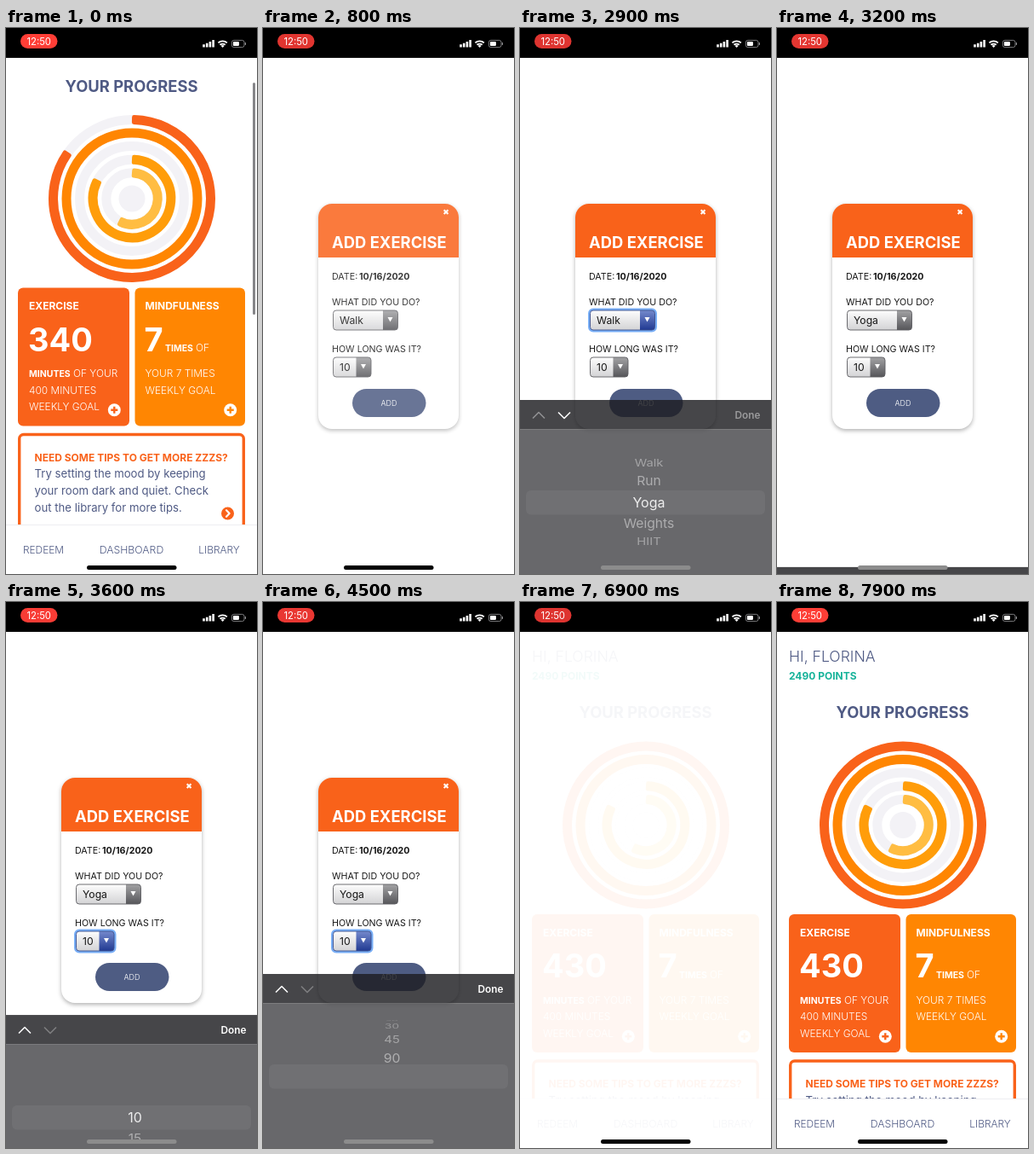
An HTML page that plays this animation: 295 px wide and 640 px high, repeating every 8 s.

```html
<!DOCTYPE html>
<html lang="en">
<head>
<meta charset="utf-8">
<title>Wellness tracker</title>
<style>
html, body { margin: 0; width: 100%; height: 100%; overflow: hidden; background: #fff; }
svg { display: block; width: 295px; height: 640px; }
text { font-family: Inter, "Open Sans", sans-serif; fill: #4f5a84; font-weight: 400; }
.mid { text-anchor: middle; }
.bold { font-weight: 700; }
.title { font-size: 18.4px; font-weight: 700; }
.white text, text.white { fill: #fff; }
.cap { font-size: 12px; font-weight: 700; }
.big { font-size: 38px; font-weight: 700; }
.thin { font-size: 11.9px; font-weight: 300; }
.unit { font-size: 10.5px; font-weight: 700; }
.body { font-size: 13.2px; }
.form text { font-size: 10.7px; fill: #161616; }
.form text.val { font-size: 12.2px; }
.row { font-size: 16px; }
.line { fill: none; stroke: #fff; stroke-linecap: round; stroke-linejoin: round; }
#popup { filter: drop-shadow(0 2px 2.5px rgba(0, 0, 0, .3)); }
</style>
</head>
<body>
<svg viewBox="0 0 295 640">
  <defs>
    <linearGradient id="face" x2="0" y2="1"><stop stop-color="#fdfdfd"/><stop offset="1" stop-color="#d3d3d5"/></linearGradient>
    <linearGradient id="gray" x2="0" y2="1"><stop stop-color="#a2a2a4"/><stop offset="1" stop-color="#56565a"/></linearGradient>
    <linearGradient id="blue" x2="0" y2="1"><stop stop-color="#7489cc"/><stop offset="1" stop-color="#213a92"/></linearGradient>
  </defs>
  <rect width="295" height="640" fill="#fff"/>

  <g id="dash">
    <g id="page">
      <text x="14" y="70" font-size="17.6" style="font-weight:300">HI, FLORINA</text>
      <text class="cap" x="14" y="91" style="fill:#17b39a">2490 POINTS</text>
      <text class="title mid" x="147.5" y="136">YOUR PROGRESS</text>
      <g id="rings" transform="translate(148 261.5)"></g>

      <g class="white">
        <rect x="14" y="366" width="131" height="162" rx="6" fill="#f9621a"/>
        <text class="cap" x="27" y="391.5">EXERCISE</text>
        <text class="big" id="minutes" x="26" y="440"></text>
        <text class="unit" x="27" y="470.5">MINUTES</text>
        <text class="thin" x="79" y="470.5">OF YOUR</text>
        <text class="thin" x="27" y="490">400 MINUTES</text>
        <text class="thin" x="27" y="509.5">WEEKLY GOAL</text>
        <circle cx="127.3" cy="509.3" r="7.5" fill="#fff"/>
        <path d="M123.3 509.3h8m-4-4v8" stroke="#f9621a" stroke-width="2.4"/>

        <rect x="151.5" y="366" width="129.5" height="162" rx="6" fill="#ff8602"/>
        <text class="cap" x="163.5" y="391.5">MINDFULNESS</text>
        <text class="big" x="162.5" y="440">7</text>
        <text class="unit" x="187" y="440.5">TIMES</text>
        <text class="thin" x="223" y="440.5">OF</text>
        <text class="thin" x="163.5" y="470.5">YOUR 7 TIMES</text>
        <text class="thin" x="163.5" y="490">WEEKLY GOAL</text>
        <circle cx="263.7" cy="509.3" r="7.5" fill="#fff"/>
        <path d="M259.7 509.3h8m-4-4v8" stroke="#ff8602" stroke-width="2.4"/>
      </g>

      <rect x="15.7" y="538" width="263.6" height="130" rx="5" fill="#fff" stroke="#f9621a" stroke-width="3.4"/>
      <text class="cap" x="33.5" y="569" style="fill:#f9621a">NEED SOME TIPS TO GET MORE ZZZS?</text>
      <text class="body" x="33.5" y="588.5">Try setting the mood by keeping</text>
      <text class="body" x="33.5" y="608.3">your room dark and quiet. Check</text>
      <text class="body" x="33.5" y="628">out the library for more tips.</text>
      <circle cx="260.5" cy="630.5" r="7.5" fill="#f9621a"/>
      <path class="line" d="M259 626.8l3.6 3.7-3.6 3.7" stroke-width="2.2"/>
    </g>
    <rect y="583" width="295" height="57" fill="#fff"/>
    <rect y="582" width="295" height="1" fill="#eeeef1"/>
    <g class="mid">
      <text class="thin" x="44" y="616">REDEEM</text>
      <text class="thin" x="147.5" y="616" style="font-size:12.3px">DASHBOARD</text>
      <text class="thin" x="250.5" y="616">LIBRARY</text>
    </g>
    <rect id="bar" x="290" y="64" width="3" height="272" rx="1.5" fill="#858588"/>
  </g>

  <g id="popup">
    <rect x="65" y="206" width="165" height="264" rx="16" fill="#fff"/>
    <path d="M65 269v-47a16 16 0 0 1 16-16h133a16 16 0 0 1 16 16v47z" fill="#f9621a"/>
    <path d="M212.7 213.2l4.8 4.8m0-4.8l-4.8 4.8" stroke="#fff" stroke-width="2.1"/>
    <text class="title white" x="81" y="258">ADD EXERCISE</text>
    <g class="form">
      <text x="81" y="295">DATE:</text>
      <text class="bold" x="113" y="295">10/16/2020</text>
      <text x="81" y="324.5">WHAT DID YOU DO?</text>
      <text x="81" y="379.5">HOW LONG WAS IT?</text>
      <g id="what"></g>
      <g id="long"></g>
    </g>
    <rect x="105" y="423" width="86.5" height="33" rx="16.5" fill="#4e5c83"/>
    <text class="mid white" x="148" y="442.5" font-size="9" style="font-weight:300">ADD</text>
  </g>

  <g id="picker">
    <rect width="295" height="34.5" fill="#1e1e21" fill-opacity=".82"/>
    <rect y="34.5" width="295" height="180" fill="#505053" fill-opacity=".86"/>
    <path id="up" class="line" d="M15 21.5l7-7 7 7" stroke-width="1.6" style="stroke-linecap:butt"/>
    <path id="down" class="line" d="M45 14.5l7 7 7-7" stroke-width="1.6" style="stroke-linecap:butt"/>
    <text id="done" class="white" x="282.5" y="22" font-size="11.8" text-anchor="end" style="font-weight:600">Done</text>
    <rect x="7" y="106" width="281" height="28.5" rx="6" fill="#fff" fill-opacity=".055"/>
    <g id="rows"></g>
  </g>

  <rect id="home" x="95" y="630" width="105.5" height="5" rx="2.5"/>

  <g>
    <rect width="295" height="35" fill="#000"/>
    <rect id="pill" x="17" y="7" width="43.5" height="17" rx="8.5"/>
    <text class="mid white" x="38.7" y="19.7" font-size="11.3">12:50</text>
    <path d="M232.5 22.5v-3.2m3.7 3.2v-4.8m3.7 4.8v-6.6m3.7 6.6v-8.6" stroke="#fff" stroke-width="2.6"/>
    <g class="line" stroke-width="1.9" style="stroke-linecap:butt">
      <path d="M249.4 17.4a7.6 7.6 0 0 1 10.4 0"/>
      <path d="M251.5 19.8a4.6 4.6 0 0 1 6.2 0"/>
    </g>
    <path d="M254.6 23l-2-2a2.9 2.9 0 0 1 4 0z" fill="#fff"/>
    <rect x="265.4" y="14.4" width="14.6" height="8.2" rx="2.4" fill="none" stroke="#8b8b8d" stroke-width=".9"/>
    <rect x="266.9" y="15.9" width="7" height="5.2" rx="1" fill="#fff"/>
    <path d="M281.4 17v3" stroke="#8b8b8d" stroke-width="1.2"/>
  </g>
</svg>
<script>
const LOOP = 8000, STEP = 100;
const $ = id => document.getElementById(id);
const set = (el, attrs) => { for (const k in attrs) el.setAttribute(k, attrs[k]); };
const clamp = u => Math.min(1, Math.max(0, u));
const smooth = u => u * u * (3 - 2 * u);
const quartOut = u => 1 - (1 - u) ** 4;

// Value at time t along [time, value] steps.
function track(t, steps, ease = smooth) {
  let value = steps[0][1];
  for (let i = 1; i < steps.length; i++) {
    const [t0, v0] = steps[i - 1], [t1, v1] = steps[i];
    if (t >= t0) value = v0 + (v1 - v0) * ease(clamp((t - t0) / (t1 - t0)));
  }
  return value;
}

// Ring segment clockwise from the top with softly rounded corners.
function segment(r, share, color) {
  const c = 2.5, half = 5.5 - c;
  const a = c / r, b = share * 2 * Math.PI - c / r;
  const at = (rad, ang) => `${rad * Math.sin(ang)} ${-rad * Math.cos(ang)}`;
  const big = b - a > Math.PI ? 1 : 0, o = r + half, i = r - half;
  return `<path d="M${at(o, a)}A${o} ${o} 0 ${big} 1 ${at(o, b)}L${at(i, b)}A${i} ${i} 0 ${big} 0 ${at(i, a)}z"
    fill="${color}" stroke="${color}" stroke-width="${2 * c}" stroke-linejoin="round"/>`;
}

const hoop = (r, color) => `<circle r="${r}" fill="none" stroke="${color}" stroke-width="11"/>`;

function rings(exercise) {
  const list = [[92.5, exercise, '#f9621a'], [77, 1, '#ff8602'], [61.4, 0], [45.8, .83, '#ff9d0a'], [30.2, .585, '#ffbd42']];
  return '<circle r="15.5" fill="#f3f2f6"/>' + list.map(([r, share, color]) =>
    share >= 1 ? hoop(r, color) : hoop(r, '#f3f2f6') + (share ? segment(r, share, color) : '')).join('');
}

function select(y, w, value, focus) {
  const x = 82.5, right = x + w, cut = right - 17.5, m = right - 9;
  const ring = focus ? `<rect x="${x - 1}" y="${y - 1}" width="${w + 2}" height="25" rx="4.5" fill="none" stroke="#78aef6" stroke-width="3"/>` : '';
  return `${ring}<rect x="${x}" y="${y}" width="${w}" height="23" rx="3.5" fill="url(#face)"/>
    <path d="M${cut} ${y}H${right - 3.5}a3.5 3.5 0 0 1 3.5 3.5v16a3.5 3.5 0 0 1 -3.5 3.5H${cut}z" fill="url(#${focus ? 'blue' : 'gray'})"/>
    <rect x="${x}" y="${y}" width="${w}" height="23" rx="3.5" fill="none" stroke="${focus ? '#3c4f8c' : '#5c5c60'}" stroke-width=".9"/>
    <path d="M${m - 3} ${y + 8}h6l-3 5.5z" fill="#fff"/>
    <text class="val" x="90" y="${y + 16}">${value}</text>`;
}

const SPORTS = ['Walk', 'Run', 'Yoga', 'Weights', 'HIIT'];
const LENGTHS = [10, 15, 20, 30, 45, 90];

// Picker wheel: rows sit on a cylinder seen from the front.
function wheel(items, pos) {
  return items.map((item, i) => {
    const k = i - pos, ang = k * .389;
    if (Math.abs(ang) > 1.5) return '';
    const near = clamp(1 - Math.abs(k) * 1.6), c = Math.cos(ang);
    const alpha = .2 + .28 * c + .4 * near;
    return `<text class="row mid white" fill-opacity="${alpha}" y="5.8"
      transform="translate(151.5 ${120 + 66 * Math.sin(ang)}) scale(${.72 + .28 * c} ${c})">${item}</text>`;
  }).join('');
}

const OPEN1 = 1548, SHUT1 = 2930, OPEN2 = 3418, SHUT2 = 5225;
const SLIDE = [[OPEN1, 640], [OPEN1 + 600, 436], [SHUT1, 436], [OPEN2, 640], [OPEN2 + 600, 436], [SHUT2, 436], [SHUT2 + 600, 640]];

function draw(t) {
  const after = t > 6500;
  set($('dash'), { opacity: track(t, [[200, 1], [600, 0], [6800, 0], [7500, 1]]) });
  set($('page'), { transform: `translate(0 ${after ? 0 : -61.5})` });
  set($('bar'), { opacity: after ? 0 : 1 });
  $('minutes').textContent = after ? 430 : 340;
  $('rings').innerHTML = rings(after ? 1 : .85);

  set($('popup'), { opacity: track(t, [[500, 0], [900, 1], [6400, 1], [6800, 0]]) });
  $('what').innerHTML = select(331, 76, t < SHUT1 ? 'Walk' : 'Yoga', t >= OPEN1 - 50 && t < SHUT1);
  $('long').innerHTML = select(386, 44.5, t < SHUT2 ? 10 : 90, t >= OPEN2 - 50 && t < SHUT2);

  const second = t >= OPEN2;
  set($('picker'), { transform: `translate(0 ${track(t, SLIDE, quartOut)})` });
  set($('up'), { opacity: second ? 1 : .4 });
  set($('down'), { opacity: second ? .3 : 1 });
  const pressed = (t > 2750 && t < OPEN2) || t > 5050;
  set($('done'), { opacity: pressed ? .45 : 1 });
  $('rows').innerHTML = second
    ? wheel(LENGTHS, track(t, [[3950, 0], [4500, 5.85], [4900, 5]]))
    : wheel(SPORTS, track(t, [[2050, 0], [2650, 2]]));

  const tone = track(t, [[1700, 0], [2050, 140], [5300, 140], [5600, 0]]);
  set($('home'), { fill: `rgb(${tone},${tone},${tone})` });
  const glow = .5 + .5 * Math.cos(t / 1950 * 2 * Math.PI);
  set($('pill'), { fill: `rgb(${222 + 33 * glow},${52 + 10 * glow},${48 + 6 * glow})` });
}

const start = performance.now();
function tick() {
  const t = (performance.now() - start) % LOOP;
  draw(Math.floor(t / STEP) * STEP);
  requestAnimationFrame(tick);
}
tick();
</script>
</body>
</html>
```
